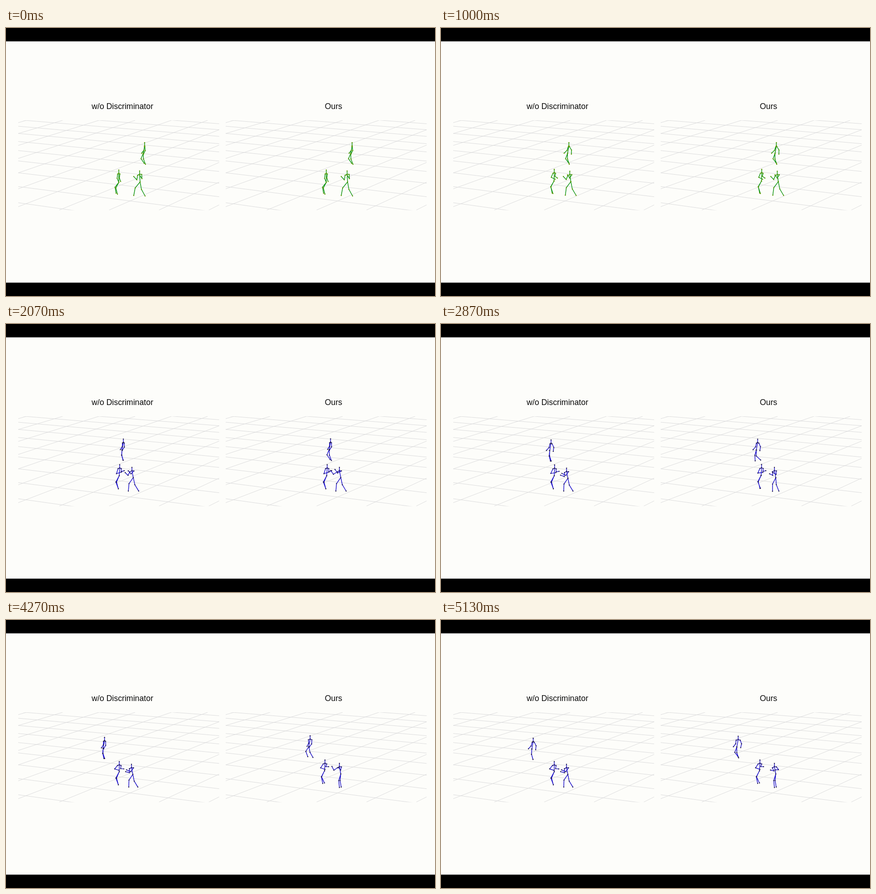
An HTML page with a canvas that plays this animation: 947x592 px, repeating every 5160 ms.

```html
<!DOCTYPE html>
<html lang="en">
<head>
<meta charset="utf-8">
<title>Motion comparison</title>
<style>
html, body { margin: 0; width: 100%; height: 100%; overflow: hidden; background: #fdfdfa; }
canvas { display: block; }
</style>
</head>
<body>
<canvas id="stage" width="947" height="592"></canvas>
<script>
const ctx = document.getElementById('stage').getContext('2d');
const LOOP = 5.16, STEP = LOOP / 155, FORECAST = 1.67;

const clamp = u => Math.min(1, Math.max(0, u));
const add = (p, dx, dy) => [p[0] + dx, p[1] + dy];

function ramp(s, from, to) {
  const u = clamp((s - from) / (to - from));
  return u * u * (3 - 2 * u);
}

// Blends numbers, points and whole poses.
function mix(a, b, u) {
  if (typeof a === 'number') return a + (b - a) * u;
  if (Array.isArray(a)) return a.map((v, i) => mix(v, b[i], u));
  return Object.fromEntries(Object.keys(a).map(k => [k, mix(a[k], b[k], u)]));
}

// Elbow or knee: the middle of the limb pushed sideways.
function joint(a, b, bend) {
  const dx = b[0] - a[0], dy = b[1] - a[1], d = Math.hypot(dx, dy) || 1;
  return [(a[0] + b[0]) / 2 - dy / d * bend, (a[1] + b[1]) / 2 + dx / d * bend];
}

// Walks at a slowing pace; without the discriminator the stride dies out.
function walker(s, ours) {
  const after = Math.max(0, s - FORECAST);
  const freeze = ours ? 0 : ramp(s, FORECAST, 2.1);
  const stride = 11 - 9.5 * freeze;
  const phase = Math.PI * (0.97 * s - 0.46);
  const swing = Math.sin(phase);
  const hip = [303 - 24.6 * s + 0.9 * s * s - (ours ? 1.6 : 0) * after, 277 + (ours ? 1 : 2.3) * after];
  const neck = add(hip, 3, -16.5);
  const lifts = [-1, 1].map(side => Math.max(0, side * swing) * (1 - freeze));
  return {
    hip, neck,
    hands: [add(neck, -8.5 - 2 * swing, 16), add(neck, 1.5 + 4 * swing, 18)],
    feet: [-1, 1].map((side, i) =>
      add(hip, 3.5 - freeze + side * stride * Math.cos(phase), 24 - freeze - 2 * lifts[i])),
    elbows: [-2, -2.5],
    knees: lifts.map(lift => 2 + 4 * lift),
    width: Math.min(0.4 + 0.8 * s, ours ? 5 : 2.3),
    tilt: 0
  };
}

// Raises both fists, then settles back a little.
function guard(s, ours) {
  const low = {
    hip: [249, 341], neck: [249, 321], hands: [[249, 341], [253, 339]], feet: [[243, 365], [246, 367]],
    elbows: [2.5, 2], knees: [5.5, 5], width: 2.5, tilt: 0
  };
  const high = {
    hip: [250, 335], neck: [251, 318], hands: [[255, 327], [261, 324]], feet: [[248, 364], [248, 364]],
    elbows: [10.5, 5.5], knees: [5, 6.5], width: 3.5, tilt: 0
  };
  const settled = { ...high, elbows: [8, 5], width: 4 };
  Object.assign(settled, ours
    ? { hip: [245, 333], neck: [246, 316.5], hands: [[246, 330], [254, 324]], feet: [[241, 361], [245, 360]] }
    : { neck: [250, 320], hands: [[249, 332], [260, 329]] });
  return mix(mix(low, high, ramp(s, 0.57, 1.43)), settled, ramp(s, 2, 4.5));
}

// Steps in from an open stance; only the full model keeps jabbing.
function boxer(s, ours) {
  const open = {
    hip: [296, 340], neck: [295, 323], hands: [[282, 328], [295, 325]], feet: [[282, 370], [307, 371]],
    elbows: [-9, -9], knees: [4.2, 2.7], width: 4.5, tilt: 1
  };
  const closed = {
    ...open, hip: [281, 339], neck: [278, 324], hands: [[263, 328], [270, 324]], feet: [[270, 369], [293, 369]],
    elbows: [-7, -6.5]
  };
  const settled = { ...closed };
  Object.assign(settled, ours
    ? { hip: [281, 340], hands: [[266, 328], [278, 329]], feet: [[278, 370], [282, 369]], knees: [3, 2] }
    : { hip: [280, 341], neck: [277, 326], hands: [[264, 335], [266, 331]], feet: [[271, 369], [291, 369]] });
  const stepIn = 1 - (1 - clamp(s / 2.07)) ** 1.5;
  const pose = mix(mix(open, closed, stepIn), settled, ramp(s, 1.9, ours ? 3.9 : 3.2));
  if (ours) {
    const jab = Math.cos((s - 2.07) / 2.2 * 2 * Math.PI) * ramp(s, FORECAST, 2.1);
    pose.hands = [add(pose.hands[0], -4.5 * jab, -4.5 * jab), add(pose.hands[1], -2 * jab, -3 * jab)];
  }
  return pose;
}

function drawFigure(pose, bone, dot) {
  const { hip, neck } = pose;
  const chains = [[add(neck, 0, -7.3), neck, hip]];
  [-1, 1].forEach((side, i) => {
    const shoulder = add(neck, side * pose.width, 1.5 - side * pose.tilt);
    const hand = pose.hands[i], foot = pose.feet[i];
    chains.push([neck, shoulder, joint(shoulder, hand, pose.elbows[i]), hand]);
    chains.push([hip, joint(hip, foot, pose.knees[i]), foot]);
  });
  ctx.strokeStyle = bone;
  ctx.lineWidth = 1.45;
  ctx.beginPath();
  for (const chain of chains) chain.forEach((p, i) => i ? ctx.lineTo(...p) : ctx.moveTo(...p));
  ctx.stroke();
  ctx.fillStyle = dot;
  for (const [x, y] of chains.flat()) {
    ctx.beginPath();
    ctx.arc(x, y, 1.2, 0, 7);
    ctx.fill();
  }
}

// Two families of floor lines seen in perspective.
function drawGrid() {
  ctx.save();
  ctx.beginPath();
  ctx.rect(27, 204, 443.5, 198.5);
  ctx.clip();
  ctx.beginPath();
  for (let k = -1; k < 10; k++) {
    ctx.moveTo(125 + 80 * k, 204);
    ctx.lineTo(-542 + 110 * k, 402);
  }
  for (let k = -4; k < 8; k++) {
    const depth = 278 / (1 - 0.054 * k);
    ctx.moveTo(27, depth - 61);
    ctx.lineTo(471, depth - 61 + 444 * depth / 3193);
  }
  ctx.strokeStyle = '#d8d8da';
  ctx.lineWidth = 0.9;
  ctx.stroke();
  ctx.restore();
}

function drawPanel(title, center, shift, s, ours) {
  const colors = s < FORECAST ? ['#0d9412', '#5d9800'] : ['#1c10cc', '#25204a'];
  ctx.fillStyle = '#0a0a0a';
  ctx.fillText(title, center, 179);
  ctx.save();
  ctx.translate(shift, 0);
  drawGrid();
  for (const actor of [walker, guard, boxer]) drawFigure(actor(s, ours), ...colors);
  ctx.restore();
}

function draw(seconds) {
  const s = Math.floor((seconds % LOOP) / STEP + 1e-6) * STEP;
  ctx.fillStyle = '#fdfdfa';
  ctx.fillRect(0, 0, 947, 592);
  ctx.fillStyle = '#000';
  ctx.fillRect(0, 0, 947, 29.5);
  ctx.fillRect(0, 562.5, 947, 29.5);
  ctx.font = '17.75px "Liberation Sans", Arial, sans-serif';
  ctx.textAlign = 'center';
  ctx.lineCap = ctx.lineJoin = 'round';
  drawPanel('w/o Discriminator', 257, 0, s, false);
  drawPanel('Ours', 723, 458, s, true);
}

const start = performance.now();
function tick() {
  draw((performance.now() - start) / 1000);
  requestAnimationFrame(tick);
}
tick();
</script>
</body>
</html>
```
